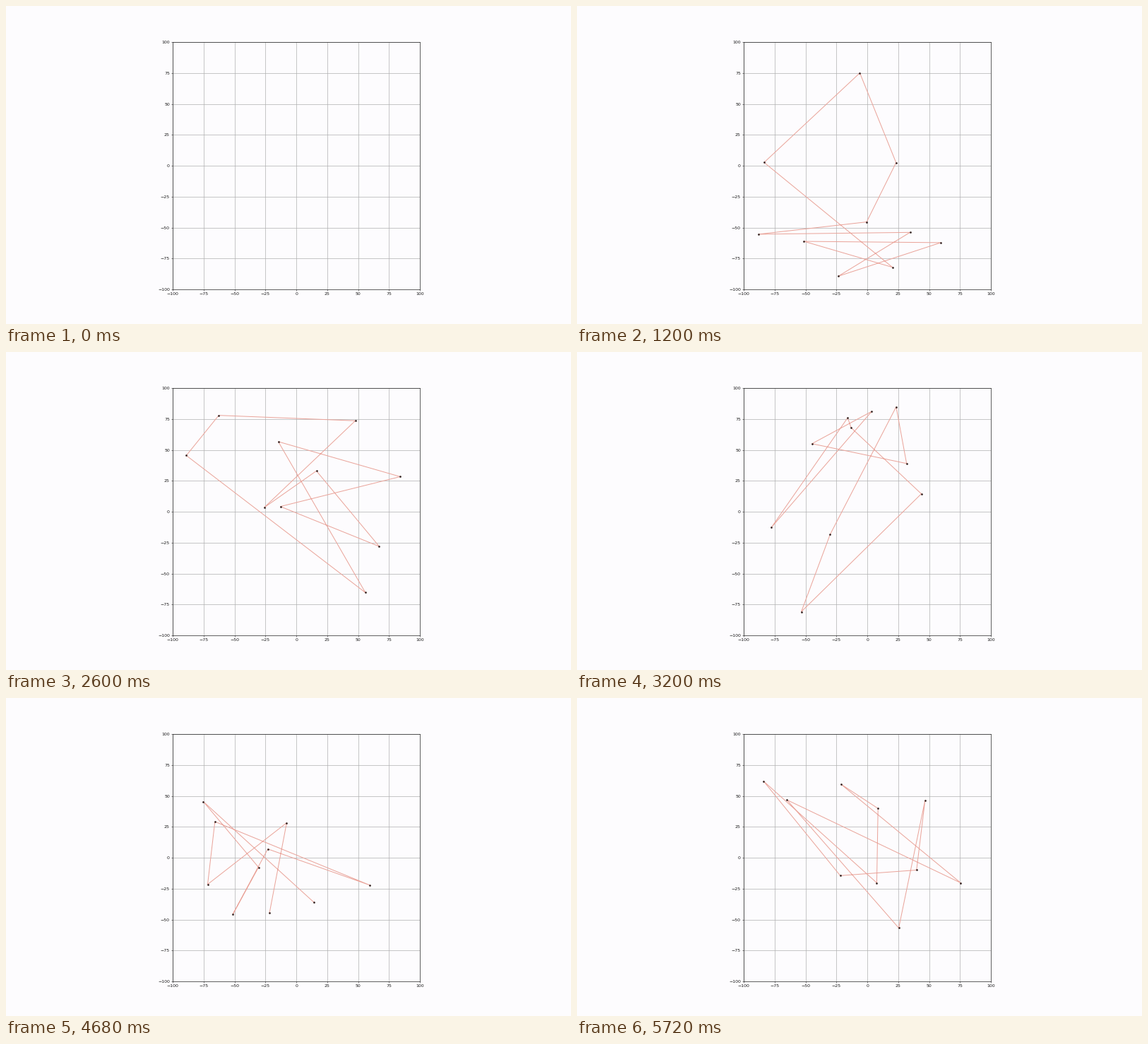
These frames come from a looping animation (800 by 450 pixels, 5.84 s). A matplotlib script:

```python
import numpy as np
import matplotlib.pyplot as plt
from matplotlib.animation import FuncAnimation

DPI = 45
PX = 72 / DPI            # one pixel in points
FPS, FRAMES = 25, 146
FIRST = 17               # empty axes until here
TOURS_PER_SECOND = 3
CITIES, REACH = 10, 90

rng = np.random.default_rng(7)
step = FPS / TOURS_PER_SECOND
starts = np.round(np.arange(FIRST, FRAMES, step)).astype(int)
tours = rng.uniform(-REACH, REACH, (len(starts), CITIES, 2))

fig = plt.figure(figsize=(800 / DPI, 450 / DPI), dpi=DPI, facecolor="#fdfcfe")
ax = fig.add_axes([236.2 / 800, 49 / 450, 349.8 / 800, 349.8 / 450],
                  facecolor="none")
ax.set(xlim=(-100, 100), ylim=(-100, 100))
ticks = np.arange(-100, 101, 25)
ax.set_xticks(ticks)
ax.set_yticks(ticks)
ax.tick_params(labelsize=10, labelcolor="#1c1c1c")
ax.grid(color="#b0b0b0", linewidth=0.7 * PX)
for spine in ax.spines.values():
    spine.set(linewidth=0.7 * PX, edgecolor="#202020")

path, = ax.plot([], [], color="#eaa49a", lw=PX, zorder=3)
dots, = ax.plot([], [], "o", color="#33211f", ms=2.7 * PX, mew=0, zorder=4)


def draw(i):
    """Show a random tour: open on its first frame, closed afterwards."""
    k = np.searchsorted(starts, i, side="right") - 1
    cities = route = tours[k] if k >= 0 else np.empty((0, 2))
    if k >= 0 and i > starts[k]:
        route = np.vstack([cities, cities[:1]])
    path.set_data(*route.T)
    dots.set_data(*cities.T)
    return path, dots


anim = FuncAnimation(fig, draw, frames=FRAMES, interval=1000 / FPS,
                     repeat=True, repeat_delay=0)
plt.show()
```
